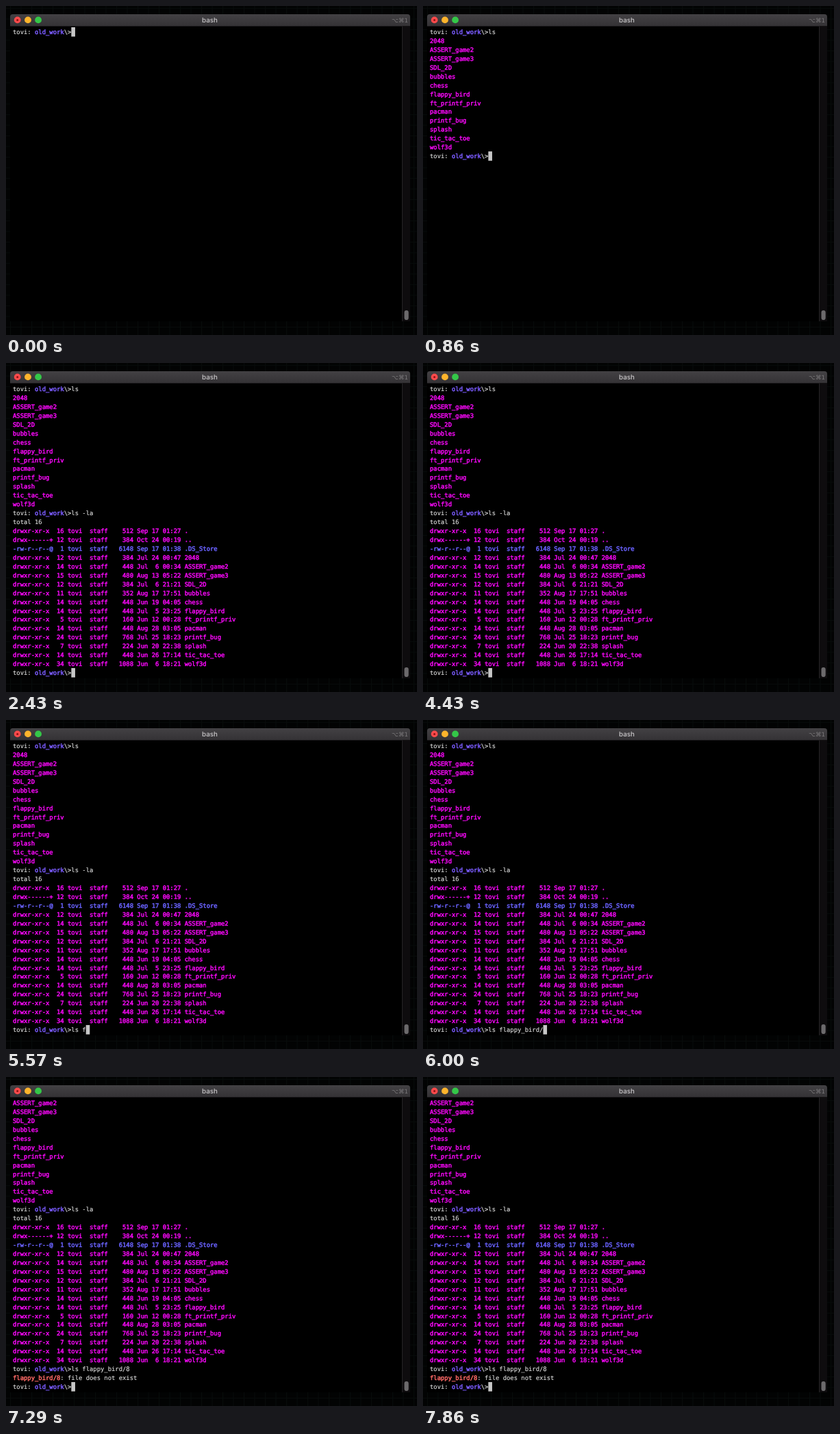
An HTML page for the animation above (8 s loop, 600 px wide and 480 px high).

```html
<!DOCTYPE html>
<html lang="en">
<head>
<meta charset="utf-8">
<title>Terminal session</title>
<style>
  html, body { margin: 0; width: 100%; height: 100%; overflow: hidden; background: #000; }
  svg { display: block; width: 600px; height: 480px; }
  text { white-space: pre; text-rendering: geometricPrecision; }
  #rows { font: 8.87px "DejaVu Sans Mono", monospace; fill: #dedede; stroke: #dedede; stroke-width: .15px; }
  .title { font: 500 9.8px Inter, sans-serif; fill: #c9c7c9; text-anchor: middle; }
  .keys { font: 8.6px "DejaVu Sans", sans-serif; fill: #7c7a7c; text-anchor: end; }
  .dir, .path, .file, .err { stroke-width: .5px; }
  .dir { fill: #f408f4; stroke: #f408f4; }
  .path { fill: #7b5cff; stroke: #7b5cff; }
  .file { fill: #6a62ff; stroke: #6a62ff; }
  .err { fill: #ff6a66; stroke: #ff6a66; }
</style>
</head>
<body>
<svg viewBox="0 0 600 480">
  <defs>
    <pattern id="grid" width="15.5" height="15.5" patternUnits="userSpaceOnUse" x="6" y="3">
      <path d="M.5 0V15.5M0 .5H15.5" stroke="#070b0a" fill="none"/>
    </pattern>
    <linearGradient id="bar" x2="0" y2="1">
      <stop stop-color="#434144"/>
      <stop offset="1" stop-color="#343235"/>
    </linearGradient>
  </defs>
  <rect width="600" height="480" fill="#020303"/>
  <rect width="600" height="480" fill="url(#grid)"/>
  <path d="M6 29H590V460H6Z"/>
  <path d="M6 29.5V16Q6 12 10 12H586Q590 12 590 16V29.5Z" fill="url(#bar)"/>
  <circle cx="16.7" cy="20.4" r="4.9" fill="#fb4a4b"/>
  <circle cx="16.7" cy="20.4" r="1.5" fill="#8c1214"/>
  <circle cx="32" cy="20.4" r="4.9" fill="#fdb42c"/>
  <circle cx="47.1" cy="20.4" r="4.9" fill="#34c748"/>
  <text class="title" x="297.5" y="24.2">bash</text>
  <text class="keys" x="587" y="24.2">⌥⌘1</text>
  <rect x="578" y="29.5" width="12" height="430.5" fill="#0e0c0e"/>
  <path d="M578.5 29.5V460" stroke="#262426"/>
  <rect x="581.5" y="444" width="6.2" height="14" rx="3.1" fill="#6c6a6c"/>
  <g id="rows"></g>
  <rect id="cursor" width="5.6" height="13.6" fill="#c7c7c7"/>
</svg>
<script>
const LOOP = 8000, LEFT = 10, CHAR = 5.34, LINE = 12.94, BASE = 41, FIT = 33;
const USER = "tovi", PATH = "old_work";
const PROMPT_LENGTH = `${USER}: ${PATH}\\>`.length;

// links, size, date, name
const folders = [
  "12 384 Jul 24 00:47 2048", "14 448 Jul  6 00:34 ASSERT_game2",
  "15 480 Aug 13 05:22 ASSERT_game3", "12 384 Jul  6 21:21 SDL_2D",
  "11 352 Aug 17 17:51 bubbles", "14 448 Jun 19 04:05 chess",
  "14 448 Jul  5 23:25 flappy_bird", "5 160 Jun 12 00:28 ft_printf_priv",
  "14 448 Aug 28 03:05 pacman", "24 768 Jul 25 18:23 printf_bug",
  "7 224 Jun 20 22:38 splash", "14 448 Jun 26 17:14 tic_tac_toe",
  "34 1088 Jun  6 18:21 wolf3d"
];

function entry(info, mode = "drwxr-xr-x ", style = "dir") {
  const [, links, size, rest] = info.match(/^(\d+) (\d+) (.*)$/);
  return [[style, `${mode}${links.padStart(3)} ${USER}  staff${size.padStart(7)} ${rest}`]];
}
const prompt = command => [["", `${USER}: `], ["path", PATH], ["", "\\>"], ["", command]];

const lines = [
  prompt("ls"),
  ...folders.map(f => [["dir", f.split(" ").pop()]]),
  prompt("ls -la"),
  [["", "total 16"]],
  entry("16 512 Sep 17 01:27 ."),
  entry("12 384 Oct 24 00:19 ..", "drwx------+"),
  entry("1 6148 Sep 17 01:38 .DS_Store", "-rw-r--r--@", "file"),
  ...folders.map(f => entry(f)),
  prompt("ls flappy_bird/8"),
  [["err", "flappy_bird/8"], ["", ": file does not exist"]],
  prompt("")
];

// time, active prompt line, typed text
const steps = [
  [0, 0, ""], [290, 0, "l"], [430, 0, "ls"],
  [710, 14, ""], [1570, 14, "l"], [1710, 14, "ls"], [1860, 14, "ls -"], [2140, 14, "ls -la"],
  [2430, 32, ""], [4570, 32, "ls"], [4710, 32, "ls "],
  [5570, 32, "ls f"], [5710, 32, "ls fl"], [5860, 32, "ls fla"], [6000, 32, "ls flappy_bird/"],
  [6710, 32, "ls flappy_bird/8"],
  [7290, 34, ""]
];

function add(parent, tag, attrs, content = "") {
  const el = document.createElementNS("http://www.w3.org/2000/svg", tag);
  for (const key in attrs) el.setAttribute(key, attrs[key]);
  el.textContent = content;
  return parent.appendChild(el);
}

const rows = document.getElementById("rows");
const cursor = document.getElementById("cursor");
const rowEls = lines.map((parts, i) => {
  const row = add(rows, "text", { x: LEFT, y: BASE + i * LINE });
  for (const [style, content] of parts) add(row, "tspan", { class: style }, content);
  return row;
});

function render(t) {
  const [, active, typed] = steps.filter(s => s[0] <= t).pop();
  const top = Math.max(0, active + 1 - FIT);
  rows.setAttribute("transform", `translate(0 ${-top * LINE})`);
  rowEls.forEach((row, i) => {
    row.style.display = i >= top && i <= active ? "" : "none";
    if (lines[i].length === 4) row.lastChild.textContent = i === active ? typed : lines[i][3][1];
  });
  cursor.setAttribute("x", LEFT - 0.1 + (PROMPT_LENGTH + typed.length) * CHAR);
  cursor.setAttribute("y", BASE - 10 + (active - top) * LINE);
}

const start = performance.now();
function tick() {
  render((performance.now() - start) % LOOP);
  requestAnimationFrame(tick);
}
tick();
</script>
</body>
</html>
```
